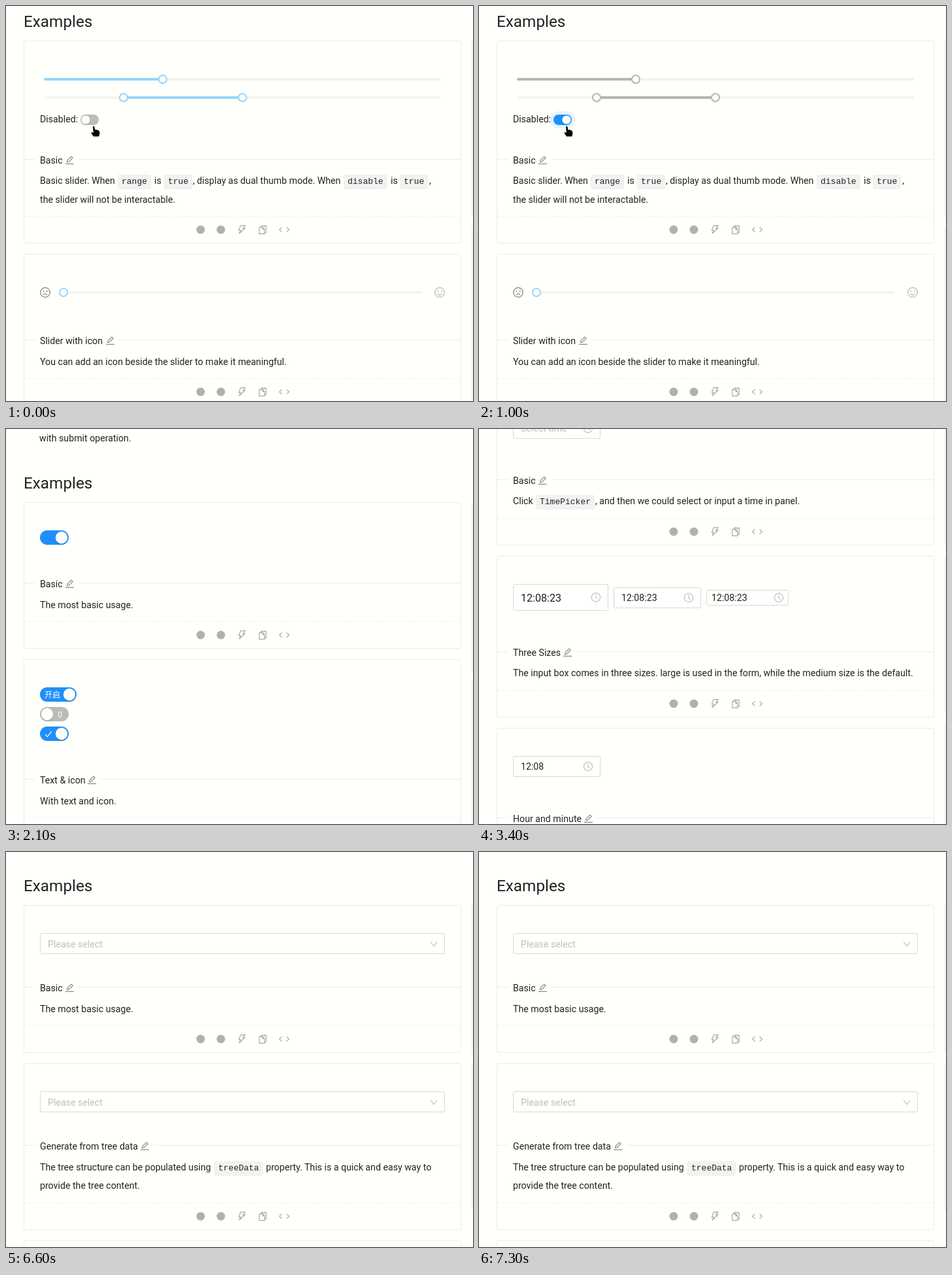
Animation of 715x604 px, one loop 7900 ms. Source, as an HTML page:

```html
<!DOCTYPE html>
<html lang="en">
<head>
<meta charset="utf-8">
<title>Component examples</title>
<style>
html, body { margin: 0; width: 100%; height: 100%; overflow: hidden; background: #fffffc; }
svg { display: block; }
text { font: 14.18px Roboto, sans-serif; fill: #222; white-space: pre; }
text.h { font-size: 24.3px; }
text.lg { font-size: 16.1px; }
text.mono { font: 13px "Liberation Mono", monospace; }
text.hint { fill: #bfc0bd; }
text.on { font: 12px Roboto, "Noto Sans CJK SC", "Noto Sans CJK", sans-serif; fill: #fff; }
.line { fill: none; stroke: #ebedea; }
.dash { fill: none; stroke: #eef0ec; stroke-dasharray: 4 3; }
.box { fill: #fffffd; stroke: #d7d9d5; }
.ico { fill: none; stroke: #a9aaa7; stroke-width: 1.2; }
.thumb { fill: #fff; filter: drop-shadow(0 1px 1px rgba(0, 35, 11, .2)); }
</style>
</head>
<body>
<svg id="stage" width="715" height="604" viewBox="0 0 715 604"></svg>
<script>
const LOOP = 7900, BLUE = '#1f90fa', GREY = '#bbbbb8';

const text = (x, y, s, cls = '') => `<text x="${x}" y="${y}" class="${cls}">${s.replace(/&/g, '&amp;')}</text>`;
const rect = (x, y, w, h, attrs) => `<rect x="${x}" y="${y}" width="${w}" height="${h}" ${attrs}/>`;
const circle = (x, y, r, attrs) => `<circle cx="${x}" cy="${y}" r="${r}" ${attrs}/>`;
const path = (x, y, d, attrs = 'class="ico"') => `<path transform="translate(${x} ${y})" d="${d}" ${attrs}/>`;
const heading = y => text(27, y, 'Examples', 'h');
const box = (x, y, w, h) => rect(x + .5, y + .5, w - 1, h - 1, 'rx="2" class="box"');

const code = (x, y, s) =>
  rect(x + .5, y - 13.5, s.length * 7.8 + 11, 21, 'rx="2.5" fill="#f2f3f1" stroke="#eeefed"') +
  text(x + 6, y, s, 'mono');

const pencil = (x, y) => path(x, y,
  'M0 12.4H13M2.6 9.6L3.2 6.8L9 1L11.2 3.2L5.4 9Z', 'class="ico" style="stroke:#8b8c89"');

function actions(y, dx) {
  const x = 298 + dx;
  return circle(x, y, 6.5, 'fill="#b0b1ae"') + circle(x + 31, y, 6.5, 'fill="#b0b1ae"') +
    path(x + 63, y, 'M-1.6-6.4H5L1.8-2.2H4.8L-4 6L-1.8 .9H-4.6Z') +
    path(x + 95, y, 'M-2.6-3.6V-5.4H5.2V4.4H3M-5.2-3.4H.2L2.8-.8V6.4H-5.2ZM0-3.2V-.6H2.6M-.5-7V-4.4M3-7V-4.4') +
    path(x + 128, y, 'M-3.6-3.6L-7.4 0L-3.6 3.6M3.6-3.6L7.4 0L3.6 3.6');
}

// A demo card: frame, titled divider and action bar.
function card({ top, bottom, rule, title, edit, dash, width = 670, dx = 0 }) {
  let s = rect(27.5, top + .5, width - 1, bottom - top, 'rx="2" class="line"');
  if (!title) return s;
  s += `<path class="line" d="M28 ${rule + .5}H44M${edit + 20} ${rule + .5}H${26 + width}"/>` +
    text(52, rule + 7, title) + pencil(edit, rule - 5);
  if (dash) s += `<path class="dash" d="M28 ${dash + .5}H${26 + width}"/>` + actions(dash + 21, dx);
  return s;
}

const nextColumn = (...spans) => spans.map(([a, b]) => `<path class="line" d="M713.5 ${a}V${b}"/>`).join('');

const rail = (x, y, w) => rect(x, y - 2, w, 4, 'rx="2" fill="#f3f4f1"');
const track = (a, b, y) => rect(a, y - 2, b - a, 4, 'rx="2" fill="currentColor"');
const handle = (x, y) => circle(x, y, 6, 'fill="#fffffe" stroke="currentColor" stroke-width="2"');

function face(x, y, color, mouth) {
  return `<g fill="none" stroke="${color}" stroke-width="1.3">` + circle(x, y, 7.3, '') +
    path(x, y, mouth, '') + '</g>' +
    circle(x - 2.7, y - 1.8, 1, `fill="${color}"`) + circle(x + 2.7, y - 1.8, 1, `fill="${color}"`);
}

const toggle = (y, w, on, label = '') =>
  rect(52, y, w, 22, `rx="11" fill="${on ? BLUE : GREY}"`) +
  circle(on ? 41 + w : 63, y + 11, 9.2, 'class="thumb"') + label;

const clock = (x, y) => `<g class="ico" style="stroke:#bfc0bd">` + circle(x, y, 6.6, '') +
  path(x, y, 'M0-4V.5L2.6 2.6', '') + '</g>';

const timeInput = (x, y, w, h, pad, value, cls) =>
  box(x, y, w, h) + text(x + pad, y + h / 2 + (cls === 'lg' ? 6.5 : 5), value, cls) + clock(x + w - (pad > 8 ? 19 : 15), y + h / 2);

const select = y => box(52, y, 620, 32) + text(64, y + 22, 'Please select', 'hint') +
  path(655, y + 17, 'M-4.8-3.4L0 3L4.8-3.4', 'class="ico" style="stroke:#bfc0bd"');

const checkbox = (x, y) => box(x, y, 16, 16);

function transferList(x, first, count, name, nameX, barHeight) {
  let s = box(x, 240, 180, 200) + `<path class="line" d="M${x + 1} 280.5H${x + 179}"/>` +
    checkbox(x + 13, 252) + path(x + 38, 261, 'M-4-2.2L0 2.4L4-2.2', 'class="ico" style="stroke:#444"') +
    text(x + 47, 265, count + ' items') + text(nameX, 265, name);
  for (let i = 0; i < 5; i++)
    s += checkbox(x + 13, 289 + 32 * i) + text(x + 37, 302 + 32 * i, 'content' + (first + i));
  return s + rect(x + 167, 281, 12, 158, 'fill="#bebfbc"') + rect(x + 167, 281, 1, 158, 'fill="#adaeab"') +
    rect(x + 170, 284, 6, barHeight, 'rx="3" fill="#757877"');
}

const moveButton = (y, d) => rect(240.5, y + .5, 23, 23, 'rx="2" fill="#f4f5f1" stroke="#d9dad7"') +
  path(252, y + 12.5, d);

const HAND = 'M-1.5 0Q0-1.4 1 .2L1.8 5L3 4.6L4.6 5L6 5.2L8.2 6.4L9 10L7.8 15H-.4L-3.6 10.4Q-4.4 8.6-2.6 8.6L-.6 9.6Z';
const ARROW = 'M.6 .8V16.2L4.3 12.8L6.7 18.6L9.3 17.5L6.9 11.9H12Z';
const cursor = (x, y, d) => path(x, y, d, 'fill="#000" stroke="#fff" stroke-width="1" paint-order="stroke"');

const sliders = () => heading(32) +
  card({ top: 53, bottom: 362, rule: 234, title: 'Basic', edit: 91, dash: 321 }) +
  rail(58, 112, 608) + rail(58, 140, 608) +
  '<g id="sliders">' + track(58, 240, 112) + handle(240, 112) +
  track(180, 362, 140) + handle(180, 140) + handle(362, 140) + '</g>' +
  text(52, 178, 'Disabled:') + '<rect id="wave" fill="#1890ff"/>' +
  rect(114, 166, 28, 16, 'id="pill" rx="8"') + circle(122, 174, 6.6, 'id="knob" class="thumb"') +
  cursor(134.5, 184.5, HAND) +
  text(52, 272, 'Basic slider. When') + code(171, 272, 'range') + text(227, 272, 'is') + code(242, 272, 'true') +
  text(286, 272, ', display as dual thumb mode. When') + code(517, 272, 'disable') + text(589, 272, 'is') +
  code(603, 272, 'true') + text(648, 272, ',') + text(52, 301, 'the slider will not be interactable.') +
  card({ top: 379, bottom: 620, rule: 510, title: 'Slider with icon', edit: 153, dash: 569 }) +
  face(60, 438, '#858683', 'M-3 4Q0-.6 3 4') + rail(82, 438, 554) +
  '<g color="#9bd6f8">' + handle(88, 438) + '</g>' + face(664, 438, '#b8b9b6', 'M-3.4 1.6Q0 6.4 3.4 1.6') +
  text(52, 549, 'You can add an icon beside the slider to make it meaningful.') +
  nextColumn([54, 323], [339, 604]);

const switches = () => text(51, 19, 'with submit operation.') + heading(91) +
  card({ top: 112, bottom: 335, rule: 235, title: 'Basic', edit: 91, dash: 294 }) +
  toggle(155, 44, true) + text(52, 274, 'The most basic usage.') +
  card({ top: 352, bottom: 640, rule: 535, title: 'Text & icon', edit: 125, dash: 594 }) +
  toggle(395, 56, true, text(59, 410.5, '开启', 'on')) +
  toggle(425, 44, false, text(79.5, 440.5, '0', 'on')) +
  toggle(455, 44, true, path(65, 467, 'M-5-.2L-1.8 3.6L5-4.6', 'fill="none" stroke="#fff" stroke-width="1.2"')) +
  text(52, 574, 'With text and icon.') + nextColumn([112, 370], [384, 604]);

const timePickers = () =>
  card({ top: -80, bottom: 177, rule: 77, title: 'Basic', edit: 91, dash: 136 }) +
  timeInput(52, -17, 134, 32, 12, 'Select time', 'hint') +
  text(52, 115, 'Click') + code(87, 115, 'TimePicker') +
  text(178, 115, ', and then we could select or input a time in panel.') +
  card({ top: 194, bottom: 440, rule: 340, title: 'Three Sizes', edit: 129, dash: 399 }) +
  timeInput(52, 237, 146, 41, 12, '12:08:23', 'lg') +
  timeInput(206, 242, 134, 32, 12, '12:08:23') + timeInput(348, 246, 126, 24, 8, '12:08:23') +
  text(52, 378, 'The input box comes in three sizes. large is used in the form, while the medium size is the default.') +
  card({ top: 457, bottom: 700, rule: 594, title: 'Hour and minute', edit: 161 }) +
  timeInput(52, 500, 134, 32, 12, '12:08') + nextColumn([0, 177], [194, 432], [448, 604]);

const transfer = () =>
  text(27, 32, 'Transfer the elements between two columns in an intuitive and efficient way.') +
  text(27, 74, 'One or more elements can be selected from either column, one click on the proper') +
  code(545, 74, 'direction') + text(631, 74, 'button, and the transfer') +
  code(28, 103, 'target') + text(88, 103, '. As you can see in the API description, these names are reflected in.') +
  heading(176) +
  card({ top: 197, bottom: 590, rule: 490, title: 'Basic', edit: 91, dash: 549, width: 1356, dx: 343 }) +
  transferList(52, 1, 11, 'Source', 175, 56) + transferList(272, 12, 9, 'Target', 399, 72) +
  moveButton(314, 'M-3.2-4.4L3.4 0L-3.2 4.4') + moveButton(342, 'M3.2-4.4L-3.4 0L3.2 4.4') +
  text(52, 528, 'The most basic usage of') + code(211, 528, 'Transfer') +
  text(290, 528, 'involves providing the source data and target keys arrays, plus the rendering');

const treeSelects = () => heading(60) +
  card({ top: 81, bottom: 306, rule: 206, title: 'Basic', edit: 91, dash: 265 }) +
  select(124) + text(52, 245, 'The most basic usage.') +
  card({ top: 323, bottom: 577, rule: 448, title: 'Generate from tree data', edit: 206, dash: 536 }) +
  select(366) + text(52, 487, 'The tree structure can be populated using') + code(319, 487, 'treeData') +
  text(398, 487, 'property. This is a quick and easy way to') + text(52, 515, 'provide the tree content.') +
  card({ top: 594, bottom: 700 }) + nextColumn([81, 307], [323, 548]) +
  '<g id="pointer">' + cursor(217, 33, ARROW) + '</g>';

const scenes = [[0, sliders], [2100, switches], [3400, timePickers], [5000, transfer], [6600, treeSelects]];
const $ = id => document.getElementById(id);
$('stage').innerHTML = scenes.map(([, draw]) => `<g>${draw()}</g>`).join('');
const layers = [...$('stage').children];

const set = (el, attrs) => Object.entries(attrs).forEach(([k, v]) => el.setAttribute(k, v));
const mix = (a, b, p) => `rgb(${a.map((v, i) => Math.round(v + (b[i] - v) * p))})`;

function update(t) {
  const current = scenes.filter(([start]) => start <= t).length - 1;
  layers.forEach((g, i) => g.style.display = i === current ? '' : 'none');

  // The switch moves in tenths of a second, then its ring fades.
  const step = Math.floor((t - 900) / 100);
  const p = step < 0 ? 0 : step === 0 ? .6 : 1;
  $('sliders').style.color = mix([148, 214, 244], [179, 182, 180], p);
  set($('pill'), { fill: mix([187, 187, 184], [31, 144, 250], p) });
  set($('knob'), { cx: 122 + 12 * p });
  const spread = step < 1 ? 3 : step < 6 ? 5 + Math.min(1, (step - 1) * .5) : 2;
  const alpha = step < 0 || t >= 1900 ? 0 : step === 0 ? .14 : Math.max(.03, .11 * .72 ** (step - 1));
  set($('wave'), {
    x: 114 - spread, y: 166 - spread, width: 28 + 2 * spread, height: 16 + 2 * spread,
    rx: 8 + spread, opacity: alpha
  });

  $('pointer').style.display = t >= 7100 && t < 7300 ? '' : 'none';
}

const began = performance.now();
function tick() {
  update((performance.now() - began) % LOOP);
  requestAnimationFrame(tick);
}
tick();
</script>
</body>
</html>
```
